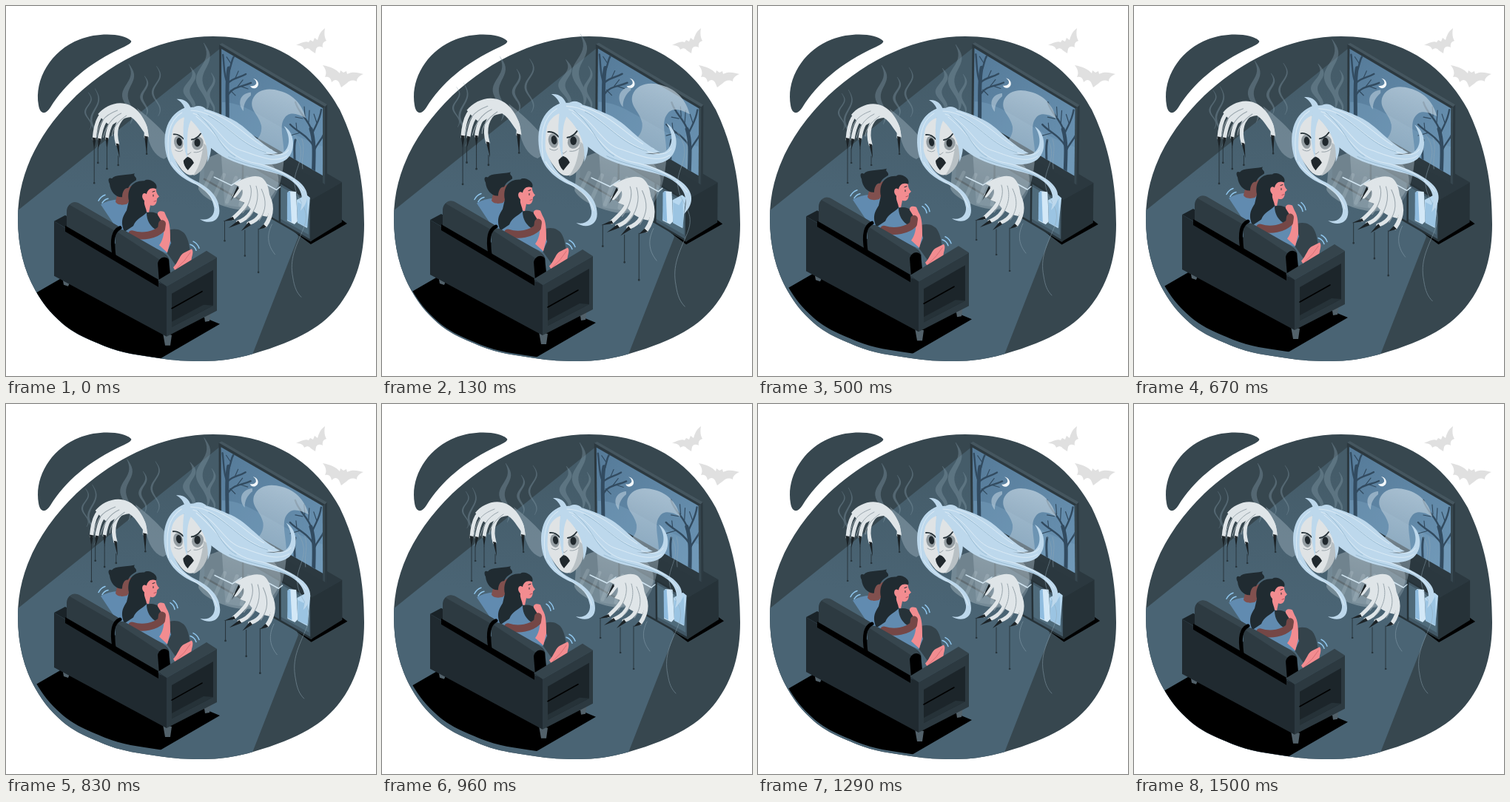
Recreate the animation shown at these times as an HTML page. Size 500 by 500 pixels, loop 1540 ms.

```html
<!DOCTYPE html>
<html lang="en">
<head>
<meta charset="utf-8">
<title>Ghost from the TV</title>
<style>
html,body{margin:0;width:100%;height:100%;overflow:hidden;background:#fff}
svg{display:block;width:100vw;height:100vh}
.ln{fill:none;stroke-linecap:round;stroke-linejoin:round}
</style>
</head>
<body>
<svg viewBox="0 0 500 500">
<defs>
  <path id="blob" d="M280 41C368 41 421 85 451 140C475 190 484 240 484 295C484 338 474 372 452 402C430 432 396 452 334 470C310 477 288 480 265 480C244 480 226 479 207 476C180 472 156 469 134 460C108 449 92 443 75 428C59 414 50 402 40 385C24 357 16 325 16 287C16 220 50 165 95 121C150 70 215 41 280 41Z"/>
  <clipPath id="room"><use href="#blob"/></clipPath>
  <clipPath id="glass"><path d="M291 58L428 138V229L291 150Z"/></clipPath>
  <linearGradient id="floor" x1="260" y1="90" x2="230" y2="270" gradientUnits="userSpaceOnUse">
    <stop offset="0" stop-color="#455c69"/><stop offset="1" stop-color="#4a6474"/>
  </linearGradient>
  <linearGradient id="sky" x1="0" y1="0" x2="1" y2="1">
    <stop offset="0" stop-color="#557a98"/><stop offset="1" stop-color="#6a93b3"/>
  </linearGradient>
  <linearGradient id="mist" x1="370" y1="115" x2="330" y2="270" gradientUnits="userSpaceOnUse">
    <stop offset="0" stop-color="#c3d5e2" stop-opacity=".72"/><stop offset="1" stop-color="#9fb2be" stop-opacity=".25"/>
  </linearGradient>
</defs>

<use href="#blob" fill="#37474f"/>
<path fill="#37474f" d="M169 47C160 37 125 35 100 45C60 60 38 100 44 134C46 147 54 147 60 137C80 105 110 78 160 55C168 51 170 49 169 47Z"/>
<g fill="#e0e0e0">
  <path d="M431 30C424 35 423 40 421 46L417 43L415 48L411 46L409 49C405 47 398 50 392 53C398 53 402 55 403 59C407 56 410 57 412 60L418 64L419 58C421 54 424 54 428 56C427 51 429 48 433 47C430 42 430 36 431 30Z"/>
  <path d="M428 80C438 82 446 85 451 91L452 87L456 90L460 88L461 92C468 88 476 90 483 92C478 94 474 97 474 102C468 99 464 101 461 104L453 110L450 103C447 99 444 99 440 103C439 97 436 95 431 96C434 90 432 85 428 80Z"/>
</g>
<path clip-path="url(#room)" fill="url(#floor)" d="M10 281L290 57L395 312L331 476L300 500H0Z"/>

<g id="tv">
  <path d="M365 287L412 322L461 294L450 286L412 306Z"/>
  <path fill="#2b383f" d="M268 178L310 154L454 238L412 262Z"/>
  <path fill="#425866" d="M268 178L412 262V318L268 235Z"/>
  <path fill="#263238" d="M412 262L454 238V292L412 318Z"/>
  <path fill="#4f6b7b" d="M370 243L409 266V309L370 287Z"/>
  <path class="ln" stroke="#263238" stroke-width="2.5" d="M268 179L412 263V317L268 234M370 240V292M320 210V264"/>
  <path fill="#d3e8f7" d="M382 250L392 251L394 291L390 295L380 290Z"/>
  <path fill="#8fbcdf" d="M380 252L384 250L386 292L380 289Z"/>
  <path fill="#b7d8f0" d="M393 262L406 255L411 259L407 300L394 293Z"/>
  <path fill="#7fafd4" d="M394 265L402 269L407 260L408 299L394 293Z" opacity=".5"/>
  <path fill="#2c3940" d="M288 52L292 50L434 133V243L428 240L288 158Z"/>
  <path fill="#45565f" d="M288 52L292 50L434 133L431 136Z"/>
  <path fill="#37474f" d="M428 138L431 136V241L428 239Z"/>
  <path fill="url(#sky)" d="M291 58L428 138V229L291 150Z"/>
  <g clip-path="url(#glass)">
    <path fill="#7ba3c1" opacity=".4" d="M292 130C330 130 360 165 428 190V232L292 152Z"/>
    <g class="ln" stroke="#324b60">
      <path stroke-width="5" d="M299 160C300 130 297 105 301 84"/>
      <path stroke-width="2.4" d="M299 122C306 108 318 110 331 104M299 104C294 94 295 80 293 66M301 88C305 80 304 74 308 68M300 104C309 96 314 98 324 92"/>
      <path stroke-width="1.2" d="M313 109L320 100M318 109L327 112M304 78L298 69M310 97L314 88M303 114L310 121"/>
      <path stroke-width="5" d="M415 240C416 205 418 185 412 166"/>
      <path stroke-width="2.4" d="M416 190C407 174 393 170 384 160M413 168C408 152 396 146 391 130M414 172C420 158 424 154 426 140M416 196C421 184 426 182 430 172"/>
      <path stroke-width="1.2" d="M398 171L384 175M401 152L391 150M409 157L410 141M420 158L416 146M393 168L392 158M404 149L403 136"/>
      <path stroke-width="3" d="M390 222C391 200 388 192 391 181"/>
    </g>
    <path fill="#f2f7fa" d="M334 98C341 99 344 108 337 111C333 112 331 110 330 108C335 109 339 106 338 103C338 101 336 99 334 98Z"/>
  </g>
</g>

<g id="ghost">
  <g id="smoke" fill="#7d95a2" opacity=".42"></g>
  <g class="ln" stroke="#91a8b5" stroke-width=".8" opacity=".6">
    <path d="M388 175C410 205 383 220 389 245C393 266 411 273 400 300C390 324 381 340 386 365C388 378 391 385 397 391"/>
    <path d="M358 294C350 310 353 323 362 334M398 180C403 194 397 204 399 220"/>
  </g>
  <path fill="#a3b5c0" opacity=".42" d="M178 139C196 153 220 174 231 196L214 207C201 202 195 190 191 172Z"/>
  <path fill="url(#mist)" d="M290 195C325 196 346 183 344 163C341 148 328 142 332 128C337 115 352 111 368 116C388 121 399 136 403 152C392 146 381 143 375 152C366 163 376 186 374 208C371 245 362 262 345 276L295 268Z"/>
  <path fill="#c3d5e2" opacity=".55" d="M330 118C316 119 311 132 320 143C320 133 324 127 330 122Z"/>
  <path fill="#b1bec6" opacity=".42" d="M263 212C270 204 305 190 330 196C362 205 374 234 363 248C351 270 332 278 311 274C288 270 265 258 260 247Z"/>
  <g class="ln" stroke="#dbe5eb" opacity=".16" stroke-width="5">
    <path d="M278 225L268 246M294 228L282 256M310 232L298 264M325 232L316 268"/>
  </g>
  <path class="ln" stroke="#d9edf9" stroke-width="1.5" opacity=".9" d="M281 231L304 242L316 234M346 238L364 248L369 244M352 193L358 195"/>

  <g fill="#bdd8ec">
    <path d="M243 144C241 134 236 130 231 127C241 126 248 132 250 140ZM250 141C256 134 264 135 270 140L262 147Z"/>
    <path d="M285 193C315 212 360 222 378 207C392 194 387 170 374 163C383 176 383 192 372 199C355 206 325 200 300 170Z"/>
    <path d="M272 188C305 221 355 219 378 232C396 242 402 256 396 276C410 262 408 246 390 234C362 214 325 212 292 186Z"/>
    <path d="M242 139C262 134 287 146 303 153C326 164 337 184 366 199C345 203 326 199 308 200C292 200 279 194 271 184C268 168 260 158 246 150Z"/>
    <path d="M217 200C222 222 240 234 257 241C275 250 279 262 281 272C282 283 273 290 262 287C272 294 288 292 288 276C288 256 272 244 256 236C246 231 238 225 232 214C222 196 222 170 246 146L242 139C219 147 211 172 217 200Z"/>
  </g>
  <path fill="#dfe3e5" d="M226 166C219 188 224 202 234 216C242 228 250 232 259 225C269 215 274 205 273 191C268 176 258 160 246 150C237 151 230 157 226 166Z"/>
  <path fill="#b8c0c4" d="M273 191C275 209 265 226 253 229C263 215 264 204 267 186Z"/>
  <g fill="#949da2">
    <ellipse cx="233.500" cy="185" rx="6" ry="9" transform="rotate(-12 233.500 185)"/>
    <ellipse cx="259" cy="186" rx="7.500" ry="9" transform="rotate(18 259 186)"/>
  </g>
  <g fill="#20282d">
    <ellipse cx="234.500" cy="184" rx="3.500" ry="5.500" transform="rotate(-10 234.500 184)"/>
    <ellipse cx="258.500" cy="185" rx="4" ry="5.500"/>
    <path d="M245 204C250 205 252 208 254 212C251 216 248 219 246 222C242 218 240 213 240 209Z"/>
  </g>
  <g class="ln" stroke="#263238">
    <path stroke-width="1.8" d="M227 174Q234 173 240 180M251 181Q258 180 263 173"/>
    <path stroke-width=".8" stroke="#87939a" d="M243 197L246 201L250 198M229 195Q235 199 239 195M254 198Q261 199 266 194"/>
  </g>
  <path fill="#bdd8ec" d="M243 140C238 164 239 188 245 206C246 187 243 169 250 155C264 169 274 185 272 211C282 192 276 168 262 146ZM243 140C228 148 222 168 224 204C212 180 215 149 243 138Z"/>
  <g class="ln" stroke="#e4f0f8" stroke-width="1" opacity=".75">
    <path d="M250 142C285 143 300 174 333 190C355 202 372 206 380 195M253 146C285 156 291 189 319 196C342 204 362 213 378 203M257 150C288 175 298 204 330 211C359 216 385 229 400 249M238 145C220 156 217 178 221 208M224 211C238 236 277 243 284 272M268 142C306 153 322 176 345 189"/>
  </g>
  <path class="ln" stroke="#91b5cd" stroke-width=".8" d="M259 147C285 168 288 193 309 204M273 149C300 162 316 188 350 198M300 204C326 217 355 217 386 235"/>

  <g class="ln" stroke="#dfe5e8">
    <path fill="#dfe5e8" stroke="none" d="M126 147C134 137 149 130 162 133C178 136 192 154 194 178C184 170 181 158 170 151C160 152 150 158 143 163L134 156Z"/>
    <path stroke-width="5" d="M146 138C129 144 123 155 121 180M151 144C136 150 131 160 128 180"/>
    <path stroke-width="5" d="M158 145C147 151 140 162 138 179M164 147C151 156 147 169 152 187M182 152C190 162 191 169 190 177"/>
    <path stroke="#99a5ac" stroke-width="1" d="M152 142C133 149 127 159 124 178M157 146C142 153 136 166 133 178M164 149C151 158 145 168 145 176"/>
  </g>
  <path fill="#1c2327" d="M118.500 178L123.500 179L121 194ZM126 179L130.500 180L126 194ZM136 178L140 179L138 194ZM150 186L154 187L155 206ZM188 176L192.500 177L191 201Z"/>

  <g class="ln" stroke="#dfe5e8">
    <path fill="#dfe5e8" stroke="none" d="M307 240C319 233 335 226 345 232C356 241 354 257 357 270L352 284C340 282 330 276 324 266L314 262C320 256 320 249 317 245Z"/>
    <path stroke-width="5" d="M325 238C316 243 314 251 308 256M329 254C325 269 316 277 306 286M336 258C335 276 326 286 313 291M344 260C348 278 341 288 327 293"/>
    <path stroke-width="5.500" d="M349 250C361 268 358 283 349 296"/>
    <path stroke="#99a5ac" stroke-width="1" d="M329 242C333 253 328 268 319 279M337 243C342 258 337 276 325 287M344 247C351 262 351 275 341 289"/>
  </g>
  <path fill="#1c2327" d="M312 243L314 246L303 263ZM306 284L308 288L293 290ZM313 289L316 293L300 299ZM327 291L330 295L317 303ZM347 294L351 298L340 301Z"/>
  <g id="drips" class="ln" stroke="#263238"></g>
</g>

<g id="sofa">
  <path clip-path="url(#room)" d="M30 394L75 368L217 400L289 430L208 477L190 490H30Z"/>
  <path fill="#52616a" d="M76 366L87 372L84 379L78 377ZM212 442L224 445L222 459L215 459ZM267 414L277 410L275 426L269 427Z"/>

  <g id="pair" transform="translate(0 1.500)">
    <path fill="#34434b" d="M216 304C226 297 239 301 243 309C249 320 247 329 251 335L230 350L218 333Z"/>
    <path fill="#618bb0" d="M128 267C142 259 157 258 173 265L177 304L150 300Z"/>
    <path fill="#81504e" d="M151 251L171 241L175 252C172 260 166 262 164 266C157 269 149 267 148 263Z"/>
    <path fill="#202b31" d="M140 239C137 233 139 230 143 232C148 226 160 228 174 225C171 229 177 229 176 234C172 237 168 238 165 245C160 244 157 251 157 257C149 258 141 250 140 239Z"/>
    <path fill="#618bb0" d="M163 281C184 272 205 278 215 289L223 319L217 333L157 306Z"/>
    <path fill="#f28c90" d="M185 244L203 242C202 249 204 253 207 256L204 259C204 267 200 270 195 268L193 278L183 274Z"/>
    <path fill="#202b31" d="M166 262C163 246 171 234 187 235C192 230 207 238 203 246C196 243 191 247 190 253C185 249 181 256 187 262C186 268 190 272 190 278C184 284 176 286 172 296L160 304C154 290 158 283 163 275Z"/>
    <path fill="#263238" d="M190 278C203 275 211 283 215 291L204 302C195 297 190 289 190 278Z"/>
    <path class="ln" stroke="#202b31" stroke-width="1" d="M198 250L201 249M199 254V256"/>
    <path class="ln" stroke="#b34e5c" stroke-width="1" d="M200 263L203 262"/>
    <path fill="#f28c90" d="M205 281C204 276 209 275 214 277L217 284C222 291 222 304 222 316L218 332L207 322C214 313 214 300 213 294Z"/>
    <path class="ln" stroke="#754746" stroke-width="10" d="M170 307C185 312 202 308 210 300L211 293"/>
    <path fill="#f28c90" d="M226 352C233 345 235 334 241 332L251 327C255 332 249 339 251 345L239 353L229 357Z"/>
    <path class="ln" stroke="#cf696f" stroke-width=".8" d="M231 353L241 343L249 332"/>
    <g class="ln" stroke="#8ec5ec" stroke-width="1.500">
      <path d="M125 262Q128 256 134 254M130 265Q133 260 138 259M249 321Q255 323 257 329M253 317Q259 320 261 326"/>
      <path id="shake" d="M222 276Q227 279 228 285M226 273Q231 277 232 283"/>
    </g>
  </g>

  <path fill="#1a2328" d="M65 291L80 283L222 364L217 379Z"/>
  <path fill="#2d3a41" d="M82 277C83 268 90 264 98 267L152 298C145 304 143 313 144 320L145 340L82 302Z"/>
  <path fill="#37464e" d="M86 269C90 264 95 265 99 267L152 298L147 304Z"/>
  <path fill="#2d3a41" d="M148 312C149 304 155 301 160 304L211 333C220 338 222 343 220 350L206 376L148 342Z"/>
  <path fill="#37464e" d="M151 306C155 301 159 303 163 305L212 333L218 340L209 344Z"/>
  <path class="ln" stroke="#000" stroke-width="5" d="M154 300C145 304 142 315 146 337"/>
  <path d="M205 348C207 340 215 337 220 343L222 362L207 373Z"/>
  <path fill="#202a30" d="M65 291L82 301L205 373L217 378V447L65 365Z"/>
  <path d="M80 297L206 370V380L80 305Z"/>
  <path fill="#35444c" d="M205 371L271 331L285 340L217 379Z"/>
  <path fill="#2c3940" d="M217 379L285 340V412L217 447Z"/>
  <path fill="#1c252a" d="M224 389L280 357V405L224 434Z"/>
  <path fill="#263238" d="M224 427L267 404L280 405L224 434Z"/>
  <path class="ln" stroke="#000" stroke-width="1.600" d="M224 409L265 386"/>
</g>
</svg>
<script>
const LOOP = 1540, LEAD = 22;
const $ = id => document.getElementById(id);

// Wavy ribbons, thin at both ends: [x, top, bottom, sway, width]
$('smoke').innerHTML = [
  [122, 113, 192, 5, 2], [113, 118, 168, 4, 1.5], [167, 80, 160, 5, 7], [188, 96, 150, 4, 3],
  [204, 83, 150, 5, 2], [267, 52, 145, 6, 8], [249, 84, 145, 5, 8], [277, 92, 148, 4, 4]
].map(([x, top, end, sway, w]) => {
  const left = [], right = [];
  for (let i = 0; i <= 24; i++) {
    const u = i / 24, y = top + (end - top) * u;
    const mid = x + sway * Math.sin(u * 9), half = w / 2 * Math.sin(Math.PI * u) + .3;
    left.push(`${mid - half},${y}`);
    right.unshift(`${mid + half},${y}`);
  }
  return `<polygon points="${left.concat(right).join(' ')}"/>`;
}).join('');

// [x, top, bottom]
$('drips').innerHTML = [
  [121, 190, 239], [126, 192, 212], [138, 192, 220], [153, 203, 215], [191, 194, 200],
  [295, 290, 316], [322, 302, 336], [340, 300, 358]
].map(([x, a, b]) => `<path stroke-width=".9" d="M${x} ${a}V${b}"/><circle cx="${x}" cy="${b}" r=".8"/>`).join('');

// Linear interpolation through [position, value] stops
function track(p, stops) {
  for (let i = 1; i < stops.length; i++) {
    const [a, u] = stops[i - 1], [b, v] = stops[i];
    if (p <= b) return u + (v - u) * (p - a) / (b - a);
  }
  return 0;
}
const beat = [[0, 0], [.1, 1], [.3, 0], [.4, 0], [.5, 1], [.6, 0], [1, 0]];
const tilt = [[0, 0], [.25, 1], [.75, -1], [1, 0]];
const rise = [[0, 0], [.5, -10], [1, 0]];

function draw(now) {
  const t = now % LOOP, p = (t + LEAD) % LOOP / LOOP;
  const s = 1 + .088 * track(p, beat);
  $('ghost').setAttribute('transform', `translate(257 218) scale(${s}) translate(-257 -218)`);
  $('tv').setAttribute('transform', `rotate(${track(p, tilt)} 374 186)`);
  $('sofa').setAttribute('transform', `translate(0 ${track(p, rise)})`);
  $('shake').setAttribute('opacity', t > 200 && t < 1300 ? 1 : 0);
}

const start = performance.now();
function tick() {
  draw(performance.now() - start);
  requestAnimationFrame(tick);
}
tick();
</script>
</body>
</html>
```
